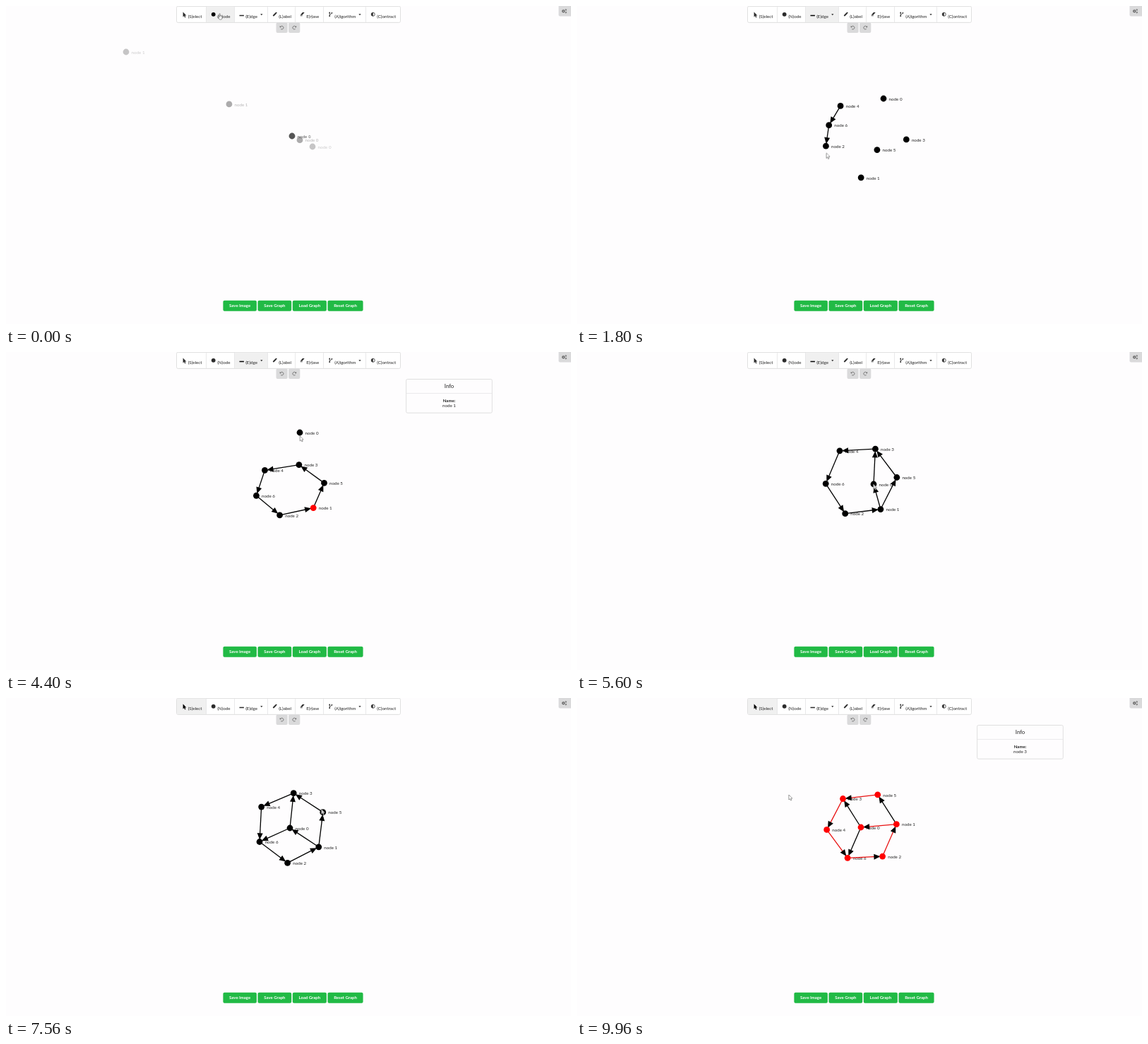
Write an HTML page with a canvas that moves like this. It is 800 px wide and 450 px high and loops after 10 s.

```html
<!DOCTYPE html>
<html lang="en">
<head>
<meta charset="utf-8">
<style>
html, body { margin: 0; width: 100%; height: 100%; overflow: hidden; background: #fefdfe; }
canvas { display: block; width: 800px; height: 450px; }
</style>
</head>
<body>
<canvas id="stage" width="800" height="450"></canvas>
<script>
const g = document.getElementById('stage').getContext('2d');
const LOOP = 10000, STEP = 40, TRAVEL = 110;
const RED = '#ff0000', INK = '#222', BORDER = '#d8d8d9';
const CENTER = [405, 184];

// Nodes along the ring, counter-clockwise; node 0 is the hub.
const ring = [4, 6, 2, 1, 5, 3];
const visitOrder = [5, 3, 4, 6, 2, 1, 0];
const visitTime = n => 9000 + 50 * visitOrder.indexOf(n);
const dropTime = n => n < 2 ? 0 : 160 * n - 120;

// A pose is a ring: hub, turn of the first node, centre, radii, gaps between neighbours in degrees.
const pose = (t, hub, turn, { x = 403, y = 183, rx = 49.5, ry = rx, inset = 1, pull = 1, gaps = Array(5).fill(60) } = {}) =>
  ({ t, pull, values: [...hub, turn, x, y, rx, ry, inset, ...gaps] });
const poses = [
  pose(1800, [434, 131], -129, { x: 410, y: 187, rx: 57.5, inset: 0.38, gaps: [32, 30, 71, 50, 46] }),
  pose(3080, [407, 123], -156, { x: 405, y: 187, pull: 2, gaps: [34, 47, 51, 51, 36] }),
  pose(4400, [416, 114], -134, { x: 401.5, y: 194.5, ry: 37 }),
  pose(5600, [420, 187], -125, { x: 401.5, y: 182, rx: 50.5 }),
  pose(7560, [402, 184], -145),
  pose(9960, [402, 183], -184.5, { x: 404, y: 182.5 })
];

// from, to, time the first node is picked, time the edge appears
const edges = [[4, 6, 1240, 1440], [6, 2, 1540, 1720], [2, 1, 1960, 2240],
  [1, 5, 2400, 2600], [5, 3, 2720, 2900], [3, 4, 3070, 3160],
  [1, 0, 4280, 4480], [0, 3, 4800, 5120], [0, 6, 5640, 5920]];

const lerp = (a, b, k) => a + (b - a) * k;
const mix = (p, q, k) => p.map((v, i) => lerp(v, q[i], k));

function poseAt(t) {
  const i = Math.max(1, poses.findIndex(p => p.t >= t)), a = poses[i - 1], b = poses[i];
  const k = Math.max(0, (t - a.t) / (b.t - a.t));
  return mix(a.values, b.values, 1 - (1 - k) ** a.pull);
}

function settledAt(n, t) {
  const [hubX, hubY, turn, x, y, rx, ry, inset, ...gaps] = poseAt(t);
  if (n === 0) return [hubX, hubY];
  const i = ring.indexOf(n);
  const angle = gaps.slice(0, i).reduce((sum, gap) => sum - gap, turn) * Math.PI / 180;
  const scale = (i % 2 ? 0.98 : 1.02) * (n === 5 ? inset : 1);
  return [x + rx * scale * Math.cos(angle), y + ry * scale * Math.sin(angle)];
}

const dropSpot = n => n < 2 ? CENTER
  : [CENTER[0] + 115 * Math.cos(2.4 * n), CENTER[1] + 110 * Math.sin(2.4 * n)];

function nodeAt(n, t) {
  const k = Math.min(1, Math.max(0, (t - dropTime(n)) / 600));
  return mix(dropSpot(n), settledAt(n, t), 1 - (1 - k) ** 3);
}

// Every click is a pointer stop; the rest are trips to the toolbar and idle places.
const stops = [
  [0, 302, 11], [60, 302, 11], [1080, 346, 14], [1800, 353, 209], [6240, 281, 17], [6320, 262, 14],
  [6900, 476, 130], [8700, 490, 13], [9200, 262, 14], [9760, 300, 137],
  ...[2, 3, 4, 5, 6].map(n => [dropTime(n), ...dropSpot(n)]),
  ...[[5, 7900], [3, 9520], ...edges.flatMap(([a, b, t1, t2]) => [[a, t1], [b, t2]])]
    .map(([n, t]) => [t, ...nodeAt(n, t)])
].sort((a, b) => a[0] - b[0]);

function cursorAt(t) {
  const i = stops.findLastIndex(s => s[0] <= t);
  const [start, ...from] = stops[i];
  const [end, ...to] = stops[i + 1] || [LOOP, ...from];
  return mix(from, to, Math.min(1, (t - start) / Math.min(TRAVEL, end - start)));
}

function pickedAt(t) {
  const open = edges.find(e => t >= e[2] && t < e[3]);
  if (open) return open[0];
  return t < 7900 ? -1 : t < 9520 ? 5 : 3;
}

function text(s, x, y, { size = 6.2, bold = false, align = 'left', color = INK } = {}) {
  g.font = `${bold ? 'bold ' : ''}${size}px Lato, sans-serif`;
  g.textAlign = align;
  g.fillStyle = color;
  g.fillText(s, x, y);
}

function box(x, y, w, h, fill, stroke) {
  g.beginPath();
  g.roundRect(x, y, w, h, 2);
  g.fillStyle = fill;
  g.fill();
  if (stroke) { g.strokeStyle = stroke; g.lineWidth = 0.8; g.stroke(); }
}

function dot(x, y, r, color, from = 0, to = 7) {
  g.beginPath();
  g.arc(x, y, r, from, to);
  g.fillStyle = color;
  g.fill();
}

function circle(x, y, r, color, width, from = 0, to = 7) {
  g.beginPath();
  g.arc(x, y, r, from, to);
  g.strokeStyle = color;
  g.lineWidth = width;
  g.stroke();
}

function poly(points, fill, stroke) {
  g.beginPath();
  points.forEach(p => g.lineTo(...p));
  g.closePath();
  g.fillStyle = fill;
  g.fill();
  if (stroke) { g.strokeStyle = stroke; g.lineWidth = 0.6; g.stroke(); }
}

function line(x1, y1, x2, y2, color, width) {
  g.beginPath();
  g.moveTo(x1, y1);
  g.lineTo(x2, y2);
  g.strokeStyle = color;
  g.lineWidth = width;
  g.stroke();
}

// Draws in a local frame.
function at(x, y, angle, paint) {
  g.save();
  g.translate(x, y);
  g.rotate(angle);
  paint();
  g.restore();
}

const arrowShape = [[0, 0], [0, 7], [1.6, 5.6], [2.7, 8], [3.8, 7.5], [2.8, 5.2], [4.8, 5]];
const handShape = [[0, 0], [1.1, 0], [1.1, 3], [4, 3.6], [4, 6], [3.2, 8], [0.3, 8], [-1.6, 4.8], [0, 5]];

// Toolbar entries: left edge, label, icon drawn around its own middle.
const tools = [
  [242, '(S)elect', c => at(-1.6, -3.4, 0, () => poly(arrowShape, c))],
  [283.5, '(N)ode', c => dot(0, 0, 2.9, c)],
  [323.5, '(E)dge', c => line(-3.2, 1.7, 3.2, 1.7, c, 1.5)],
  [370.5, '(L)abel', c => {
    line(-2.4, 2.2, 1.6, -1.8, c, 1.8);
    dot(2, -2.2, 0.9, c);
  }],
  [409.5, 'E(r)ase', c => {
    poly([[-3, 1], [0.2, -2.7], [3, -2.7], [-0.2, 1]], c);
    line(-3, 2, 0, 2, c, 0.8);
  }],
  [449.5, '(A)lgorithm', c => {
    line(-1.5, -2, -1.5, 2.4, c, 0.8);
    line(1.7, -1.8, -1.5, 1.2, c, 0.8);
    [[-1.5, -2.3], [-1.5, 2.4], [1.7, -2]].forEach(p => dot(...p, 0.9, c));
  }],
  [509.5, '(C)ontract', c => {
    circle(0, 0, 2.5, c, 0.8);
    dot(0, 0, 2.5, c, Math.PI / 2, Math.PI * 1.5);
  }]
];

function activeTool(t) {
  if (t < 1080) return 1;
  if (t < 6320) return 2;
  return t >= 8700 && t < 9200 ? 5 : 0;
}

function turnButton(x, dir) {
  box(x - 8.1, 23.5, 16.2, 14.5, '#dadadb');
  at(x, 30.7, 0, () => {
    g.scale(dir, 1);
    circle(0, 0, 2.3, '#666', 0.8, -2.5, 2.3);
    poly([[-2.9, -2.8], [-2.9, -0.4], [-0.6, -0.5]], '#666');
  });
}

function drawChrome(t) {
  const active = activeTool(t);
  box(241.5, 0.4, 317, 23, '#fff', BORDER);
  tools.forEach(([left, label, icon], i) => {
    const right = i < 6 ? tools[i + 1][0] : 558;
    if (i === active) { g.fillStyle = '#f0f0f0'; g.fillRect(left, 0.7, right - left, 22.3); }
    if (i) line(left, 0, left, 23, '#e4e4e5', 0.8);
    at(left + 10.2, 11.8, 0, () => icon(i === active ? '#000' : '#2b2b2b'));
    text(label, left + 15.7, 16.7);
  });
  [361.8, 501].forEach(x => poly([[x - 1.6, 11.3], [x + 1.6, 11.3], [x, 13.2]], INK));

  turnButton(390.6, 1);
  turnButton(408.2, -1);

  box(782.5, -2, 20, 16.5, '#dadadb');
  circle(789.2, 7.3, 1.5, '#555', 1.2);
  [5.5, 9.1].forEach(y => circle(792.7, y, 0.8, '#555', 0.8));

  let x = 307.4;
  for (const label of ['Save Image', 'Save Graph', 'Load Graph', 'Reset Graph']) {
    g.font = 'bold 6px Lato, sans-serif';
    const w = g.measureText(label).width + 17.4;
    box(x, 416.8, w, 14.9, '#21ba45');
    text(label, x + w / 2, 426.3, { bold: true, align: 'center', color: '#fff', size: 6 });
    x += w + 1.6;
  }
}

function drawInfo(n) {
  box(566.6, 38.5, 121.7, 47.7, '#fefdfe', BORDER);
  line(567, 58.5, 688, 58.5, '#e6e6e7', 0.8);
  text('Info', 627.5, 50.5, { size: 7.8, align: 'center' });
  text('Name:', 627.5, 70.6, { bold: true, align: 'center', size: 6 });
  text('node ' + n, 627.5, 78.4, { align: 'center' });
}

function drawEdge([x1, y1], [x2, y2], color) {
  const length = Math.hypot(x2 - x1, y2 - y1);
  at(x1, y1, Math.atan2(y2 - y1, x2 - x1), () => {
    line(0, 0, length - 8, 0, color, 1.3);
    poly([[length - 3, 0], [length - 12.2, -4], [length - 12.2, 4]], '#000');
  });
}

const drawNode = ([x, y], color = '#000') => dot(x, y, 4.4, color);
const drawLabel = (n, [x, y]) => text('node ' + n, x + 7.6, y + 2.8);

// The first two nodes fly in as a fading trail.
function drawArrival() {
  for (let i = 0; i < 3; i++) {
    const k = (1 - i / 2) ** 1.4;
    [[1, -235, -119], [0, 29, 15]].forEach(([n, dx, dy]) => {
      const p = [CENTER[0] + dx * k, CENTER[1] + dy * k];
      g.globalAlpha = 0.22 + 0.1 * i;
      drawLabel(n, p);
      drawNode(p);
    });
  }
  g.globalAlpha = 1;
}

function drawGraph(t) {
  if (t < STEP) return drawArrival();
  const picked = pickedAt(t);
  const spots = [0, 1, 2, 3, 4, 5, 6].map(n => nodeAt(n, t));
  const shown = [...spots.keys()].filter(n => t >= dropTime(n));
  shown.forEach(n => drawLabel(n, spots[n]));
  edges.filter(e => t >= e[3]).forEach(([a, b]) => {
    const onPath = visitOrder.indexOf(b) === visitOrder.indexOf(a) + 1;
    drawEdge(spots[a], spots[b], onPath && t >= visitTime(b) ? '#e81010' : '#000');
  });
  shown.forEach(n => drawNode(spots[n], n === picked || t >= visitTime(n) ? RED : '#000'));
  if (picked >= 0) drawInfo(picked);
}

function drawCursor([x, y]) {
  at(x, y, 0, () => poly(y < 23 ? handShape : arrowShape, '#fff', '#555'));
}

function draw(t) {
  g.fillStyle = '#fefdfe';
  g.fillRect(0, 0, 800, 450);
  drawChrome(t);
  drawGraph(t);
  // Four blended samples leave a trail when the pointer moves fast.
  g.globalAlpha = 0.35;
  for (let i = 0; i < 4; i++) drawCursor(cursorAt(t + i * 10));
  g.globalAlpha = 1;
}

function tick() {
  const t = performance.now() % LOOP;
  draw(Math.floor(t / STEP) * STEP);
  requestAnimationFrame(tick);
}
tick();
</script>
</body>
</html>
```
